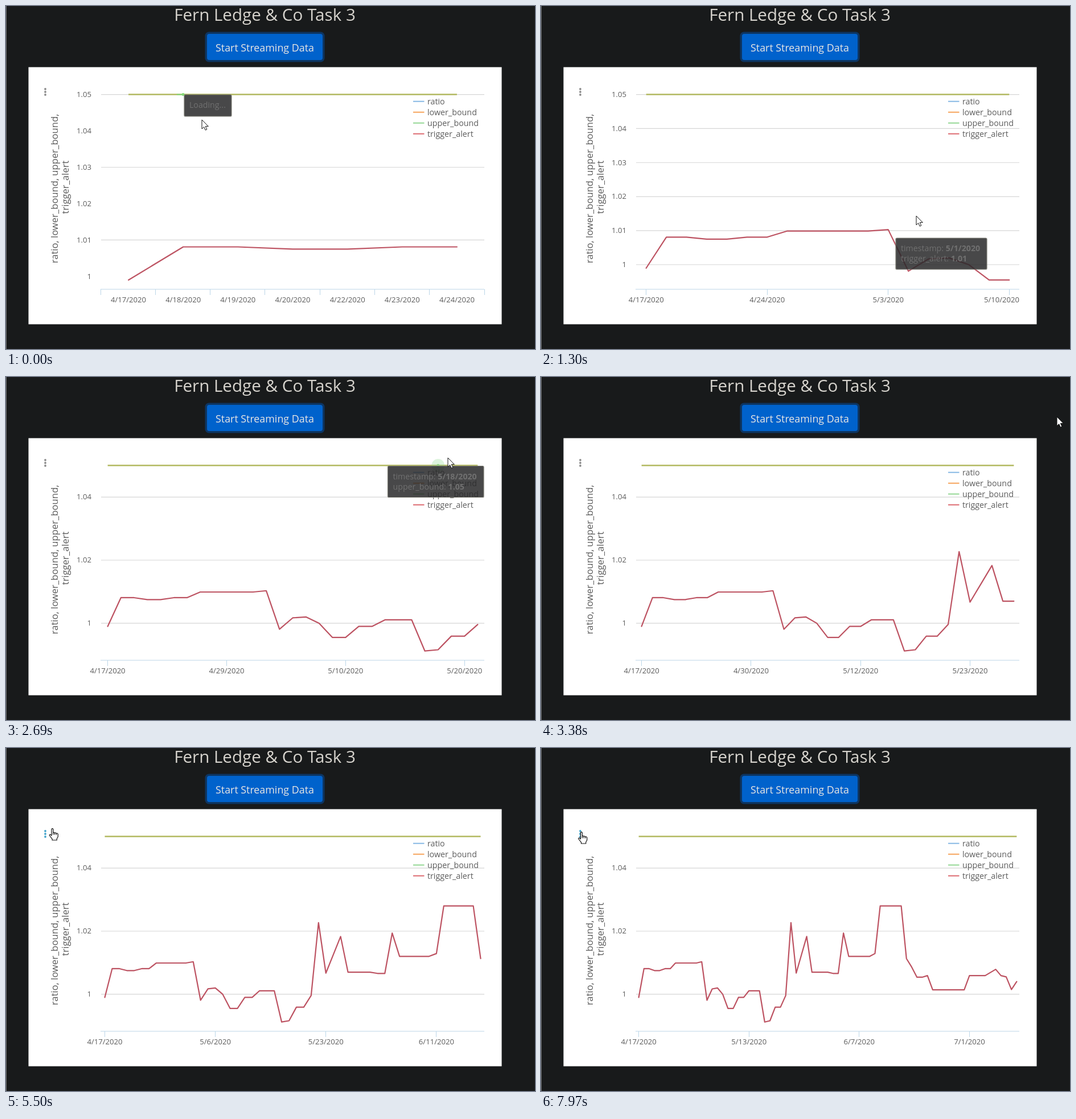
An HTML page for the animation above (8000 ms loop, 929 px wide and 603 px high).

```html
<!DOCTYPE html>
<html lang="en">
<head>
<meta charset="utf-8">
<title>Streaming chart</title>
<style>
html, body { margin: 0; width: 100%; height: 100%; overflow: hidden; background: #181a1b; }
svg { display: block; width: 929px; height: 603px; font-family: "Open Sans", "Noto Sans", sans-serif; }
text { white-space: pre; }
.tick { font-size: 13.1px; fill: #5c5c5c; }
.legend { font-size: 14.28px; fill: #5c5c5c; }
.axis { font-size: 16.6px; fill: #5c5c5c; text-anchor: middle; }
.tip { font-size: 14.2px; fill: #707070; }
</style>
</head>
<body>
<svg viewBox="0 0 929 603">
  <rect width="929" height="603" fill="#181a1b"/>
  <rect width="1" height="603" fill="#757779"/>
  <text x="454.5" y="25.5" font-size="29.6" fill="#d6d3cd" text-anchor="middle">Fern Ledge &amp; Co Task 3</text>
  <rect x="349.5" y="45.5" width="210" height="53" rx="7" fill="#0d3562"/>
  <rect x="353" y="49" width="203" height="46" rx="4" fill="#0062cc"/>
  <text x="454.5" y="80" font-size="17.85" fill="#e8e6e3" text-anchor="middle">Start Streaming Data</text>
  <rect x="39.5" y="107.5" width="831" height="452" fill="#fff"/>
  <g id="dots"><circle cx="69" cy="146" r="1.9"/><circle cx="69" cy="151" r="1.9"/><circle cx="69" cy="156" r="1.9"/></g>
  <text class="axis" transform="translate(90.5 321) rotate(-90)">ratio, lower_bound, upper_bound,</text>
  <text class="axis" transform="translate(110 318.5) rotate(-90)">trigger_alert</text>
  <g id="chart"></g>
  <g id="legend"></g>
  <g id="tip"></g>
  <path id="arrow" d="M0 0V16L3.7 12.6 6.2 18.2 8.8 17 6.3 11.6H11.3Z" fill="#fff" stroke="#111"/>
  <path id="hand" d="M4.5 1.8Q6 -.6 7.4 1.8V8Q8.7 6.5 10 8.4Q11.7 7.2 12.8 9.2Q14.8 8.3 15.8 10.5V15L13.8 18.5V21H5.6V18.8L1 13Q.2 10.8 2.6 11.1L4.5 13ZM7.4 8V11.5M10 8.6V11.5M12.8 9.4V11.8" fill="#fff" stroke="#111" stroke-width="1.2" stroke-linejoin="round"/>
</svg>
<script>
const LOOP = 8000, STEP = 132.8;
const LEFT = 167, RIGHT = 840, TOP = 155.6, BASE = 498;
const $ = id => document.getElementById(id);
const linear = u => u, smooth = u => u * u * (3 - 2 * u);

// Value in column c of key points, at position x in column 0
function at(keys, x, c = 1, ease = linear) {
  const i = Math.max(1, keys.findIndex(p => p[0] >= x));
  const a = keys[i - 1], b = x > keys.at(-1)[0] ? a : keys[i];
  if (x >= keys.at(-1)[0]) return keys.at(-1)[c];
  return a[c] + (b[c] - a[c]) * ease((x - a[0]) / (b[0] - a[0]));
}

// Key levels in thousandths above 1, "x" repeats a level
const series = ("-1 8.1x2 7.5x2 8.1x2 9.9x5 10.3 -1.9 1.7 2 0 -4.5x2 -1x2 1.1x3 -8.8 -8.4 -4.1x2 -.4 " +
  "22.7 6.7 12.5 18.3 7x4 6.6x2 19.4 12x5 12.9 28x5 11.3 8.6 5.4x2 5.9 1.4x7 5.9x4 6.9 7.9 5.9 5.5 1.5 4")
  .split(" ").flatMap(s => {
    const [v, n = 1] = s.split("x");
    return Array(+n).fill(1 + v / 1000);
  });

// One point a day, with a day left out before each of these points
const gaps = [4, 8, 9, 12, 17, 25, 33, 40, 41, 44, 50, 60];
function date(i) {
  const d = new Date(Date.UTC(2020, 3, 17 + i + gaps.filter(g => g <= i).length));
  return `${d.getUTCMonth() + 1}/${d.getUTCDate()}/2020`;
}

// Both in update steps: points loaded, pointer x and y
const loaded = [[0, 7], [10, 19], [20, 29], [30, 41], [41, 52], [52, 64], [60, 73]];
const pointer = [[0, 344, 200], [10, 659, 369], [12, 840, 245], [19, 840, 245], [20, 776, 142], [25, 906, 70],
  [36, 906, 70], [41, 75.5, 141], [44, 65, 147], [52, 163.5, 342], [58, 65, 147]];

const tips = [
  { from: 0, to: 0, x: 313, y: 156, w: 83, h: 38, rows: [["Loading...", ""]] },
  { from: 8, to: 11, x: 623, y: 408, w: 160, h: 55, rows: [["timestamp: ", date(11)], ["trigger_alert: ", "1.01"]] },
  { from: 20, to: 22, x: 670.5, y: 156.5, w: 168.5, h: 55, rows: [["timestamp: ", date(25)], ["upper_bound: ", "1.05"]] }
];

const line = (x1, y1, x2, y2, color, w = 1) =>
  `<path d="M${x1} ${y1}L${x2} ${y2}" stroke="${color}" stroke-width="${w}"/>`;
const label = (x, y, s, anchor, cls = "tick") =>
  `<text class="${cls}" x="${x}" y="${y}" text-anchor="${anchor}">${s}</text>`;
const dot = (x, r, color, alpha = 1) =>
  `<circle cx="${x}" cy="${TOP}" r="${r}" fill="${color}" opacity="${alpha}"/>`;
const crisp = v => Math.floor(v) + .5;

function drawChart(k) {
  const n = Math.floor(at(loaded, k) + .001);
  const data = series.slice(0, n), min = Math.min(...data);
  const low = min - .05 * (1.05 - min), slot = (RIGHT - LEFT) / n;
  const px = i => LEFT + (i + .5) * slot;
  const py = v => TOP + (1.05 - v) / (1.05 - low) * (BASE - TOP);
  let s = "";

  const wide = 1.05 - low > .06;
  for (let c = wide ? 4 : 5; c >= 0; c -= wide ? 2 : 1) {
    const y = py(1 + c / 100);
    if (n > 13 || c % 2) s += line(LEFT, y, RIGHT, y, "#d6d6d6", 1.2);
    s += label(150, y + 4.3, c ? "1.0" + c : "1", "end");
  }

  const axis = "#bcd6e8";
  s += line(166, BASE, RIGHT, BASE, axis);
  const every = slot > 95 ? 1 : Math.ceil(190.8 / slot);
  for (let i = 0; i < n; i += every) {
    const x = px(i), mark = crisp(every > 1 ? x : x - slot / 2 - .5);
    s += label(Math.min(x, RIGHT - 31), 520.5, date(i), "middle") + line(mark, BASE, mark, BASE + 10, axis);
  }
  if (every === 1) s += line(RIGHT + .5, BASE, RIGHT + .5, BASE + 10, axis);

  s += line(px(0), TOP - .1, px(n - 1), TOP - .1, "#b2b85f", 2.3);
  if (k === 0) s += line(300, TOP, 313, TOP, "#84d878", 2) + dot(311, 2.5, "#84d878");
  if (k >= 20 && k <= 22) s += dot(px(25), 11.5, "#90dc90", .3) + dot(px(25), 2.5, "#90d080");
  const pts = data.map((v, i) => px(i).toFixed(2) + "," + py(v).toFixed(2)).join(" ");
  s += `<polyline points="${pts}" fill="none" stroke="#bd5362" stroke-width="2.2" stroke-linejoin="round" stroke-linecap="round"/>`;
  $("chart").innerHTML = s;
}

function drawTip(k) {
  const tip = tips.find(p => k >= p.from && k <= p.to);
  $("tip").innerHTML = !tip ? "" :
    `<rect x="${tip.x}" y="${tip.y}" width="${tip.w}" height="${tip.h}" rx="2" fill="#28282a" fill-opacity=".85" stroke="#7d7d74" stroke-width="1.2"/>` +
    tip.rows.map(([name, value], i) => label(tip.x + 9, tip.y + 23 + i * 18,
      `${name}<tspan font-weight="700">${value}</tspan>`, "start", "tip")).join("");
}

function drawPointer(k) {
  const x = at(pointer, k, 1, smooth), y = at(pointer, k, 2, smooth);
  const over = x < 90 && y < 165;
  for (const [id, on] of [["arrow", !over], ["hand", over]]) {
    $(id).setAttribute("transform", `translate(${x} ${y})`);
    $(id).setAttribute("visibility", on ? "visible" : "hidden");
  }
  $("dots").setAttribute("fill", over ? "#45a5cc" : "#8c8c8c");
}

$("legend").innerHTML = [["ratio", "#86b8e4"], ["lower_bound", "#f6a35a"], ["upper_bound", "#93d793"], ["trigger_alert", "#dc6a70"]]
  .map(([name, color], i) => line(715, 167.7 + i * 19, 734.5, 167.7 + i * 19, color, 2) +
    label(740, 173 + i * 19, name, "start", "legend")).join("");

let last = -1;
function frame(now) {
  const k = Math.floor(now % LOOP / STEP + .25);
  if (k !== last) {
    last = k;
    drawChart(k);
    drawTip(k);
    drawPointer(k);
  }
  requestAnimationFrame(frame);
}
frame(0);
</script>
</body>
</html>
```
